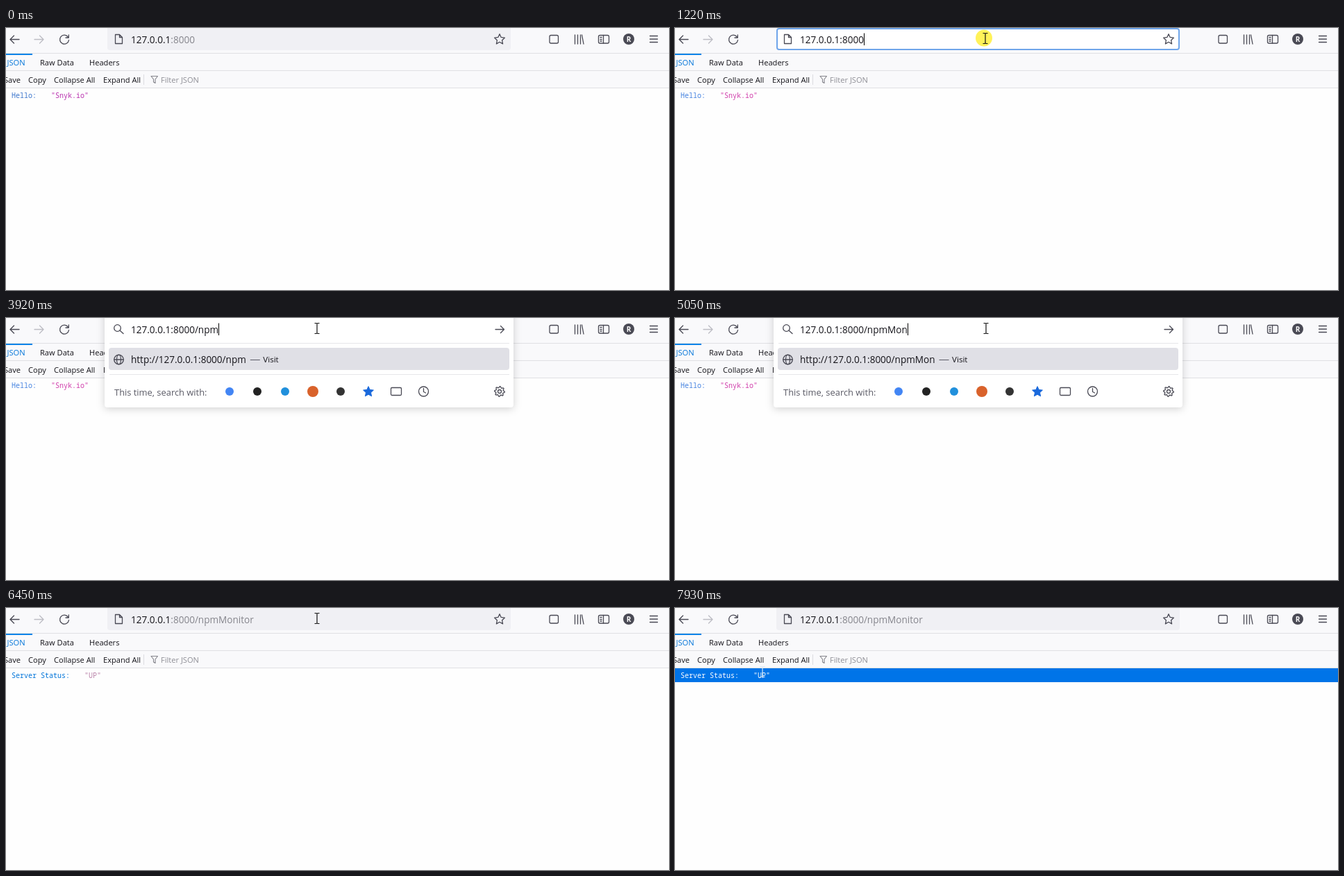
Animation of 955x378 px, one loop 8000 ms. Source, as an HTML page:

```html
<!DOCTYPE html>
<html lang="en">
<head>
<meta charset="utf-8">
<title>Browser address bar</title>
<style>
  html, body { margin: 0; width: 100%; height: 100%; overflow: hidden; background: #fefefe; }
  svg { display: block; width: 955px; height: 378px; }
  text { font: 11.1px "Open Sans", "Noto Sans", sans-serif; fill: #15141a; white-space: pre; }
  .url { font-size: 13.56px; }
  .visit { font-size: 11.6px; }
  .hint { font-size: 12.9px; fill: #5b5b66; }
  .mono { font: 10px "Noto Sans Mono", "DejaVu Sans Mono", monospace; }
  .icon { fill: none; stroke: #4a4a55; stroke-width: 1.3; stroke-linecap: round; stroke-linejoin: round; }
  #panel { filter: drop-shadow(0 2px 6px rgba(0, 0, 0, .18)); }
</style>
</head>
<body>
<svg viewBox="0 0 955 378">
  <rect width="955" height="378" fill="#fefefe"/>
  <rect width="955" height="86" fill="#f9f9fb"/>
  <path d="M0 36.5H955M0 61.5H955M0 86.5H955" stroke="#e0e0e3"/>

  <!-- navigation bar -->
  <g class="icon">
    <path d="M19 16.5H6M11.5 11L6 16.5L11.5 22"/>
    <path d="M41 16.5H54M48.5 11L54 16.5L48.5 22" stroke="#bdbdc4"/>
    <path d="M89.3 12.8A6.5 6.5 0 1 0 90.5 17.5M90.3 9.8V14H86"/>
    <rect x="783" y="10.5" width="12.5" height="11.5" rx="2"/>
    <path d="M819.5 10V23M823.5 10V23M827.5 10V23M829.5 10L832 23"/>
    <rect x="853.5" y="10.5" width="15" height="11.5" rx="2"/>
    <path d="M860.5 10.5V22M856 13.5H858M856 16.5H858M856 19H858"/>
    <path d="M927.5 11.5H938.5M927.5 16H938.5M927.5 20.5H938.5"/>
  </g>
  <circle cx="897" cy="16" r="8" fill="#4a4a55"/>
  <text x="897" y="19.8" text-anchor="middle" style="font-size:10px;font-weight:700;fill:#fff">R</text>

  <!-- viewer tabs and tools -->
  <rect y="37" width="38" height="2" fill="#0a84e8"/>
  <text x="27.5" y="54" text-anchor="end" style="fill:#0074d9">JSON</text>
  <text x="49" y="54">Raw Data</text>
  <text x="120" y="54">Headers</text>
  <text x="21" y="79" text-anchor="end">Save</text>
  <text x="32" y="79">Copy</text>
  <text x="69" y="79">Collapse All</text>
  <text x="140" y="79">Expand All</text>
  <path d="M198.5 67V82" stroke="#dcdce0"/>
  <path class="icon" d="M209 69.5H218.5L215 74V79.5L212.5 78V74Z" style="stroke:#85858c;stroke-width:1.1"/>
  <text x="223" y="79" style="fill:#8f8f96">Filter JSON</text>

  <!-- document row -->
  <rect id="row" y="87" width="955" height="20" fill="#0074e8"/>
  <text id="key" class="mono" x="8" y="101"></text>
  <text id="value" class="mono" y="101"></text>

  <!-- address bar -->
  <rect id="field" x="146" y="-4" width="581" height="36" rx="4" fill="#f0f0f4"/>
  <rect id="ring" x="147" y="1" width="579" height="30" rx="3" fill="#fff" stroke="#6fa5ea" stroke-width="2"/>

  <g id="panel">
    <rect id="sheet" fill="#fff" rx="4"/>
    <path d="M149 36.5H725M149 81.5H725" stroke="#e6e6ea"/>
    <rect x="148" y="43" width="577" height="32" rx="4" fill="#e0e0e6"/>
    <text id="link" class="url" x="180" y="65"></text>
    <path id="dash" stroke="#5b5b66"/>
    <text id="visit" class="visit" y="64.3">Visit</text>
    <text class="hint" x="156" y="112">This time, search with:</text>
    <g class="icon">
      <circle cx="160.5" cy="14.5" r="4.8"/>
      <path d="M164.2 18.2L169 22.5M705 16.5H717.5M712.5 11.5L717.5 16.5L712.5 21.5"/>
      <circle cx="162.5" cy="60" r="6.8"/>
      <ellipse cx="162.5" cy="60" rx="3" ry="6.8"/>
      <path d="M156 60H169"/>
      <rect x="554.5" y="100.5" width="15" height="11" rx="1.5"/>
      <circle cx="601.5" cy="106" r="7"/>
      <path d="M601.5 101.5V106.5L604.5 108"/>
      <path id="gear"/>
      <circle cx="711" cy="106" r="2.5"/>
    </g>
    <circle cx="322" cy="106" r="6" fill="#4285f4"/>
    <circle cx="362" cy="106" r="6" fill="#222"/>
    <circle cx="402" cy="106" r="6" fill="#2190dc"/>
    <circle cx="442" cy="106" r="8" fill="#d9622b"/>
    <circle cx="482" cy="106" r="6" fill="#333"/>
    <path id="mark" fill="#1a69dc" stroke="#1a69dc" stroke-linejoin="round"/>
  </g>

  <g id="closed" class="icon">
    <path d="M157.5 9.5H163.5L167.5 13.5V22.5H157.5ZM163.5 9.5V13.5H167.5"/>
    <path id="star"/>
  </g>
  <rect id="pick" x="180" y="7" height="18" fill="#0078d7"/>
  <text class="url" x="180" y="21.5"><tspan id="host">127.0.0.1</tspan><tspan id="rest"></tspan></text>
  <rect id="caret" y="7.5" width="1" height="17.5" fill="#000"/>

  <!-- pointer -->
  <g id="pointer">
    <circle id="glow" cx="-2" cy="-.5" r="12" fill="#fff03c" opacity=".85"/>
    <path id="beam" fill="none" stroke-width="1.2" d="M-3.5 -7.5H-1L0 -6.8L1 -7.5H3.5M0 -7V7M-3.5 7.5H-1L0 6.8L1 7.5H3.5"/>
    <path id="arrow" fill="#fff" stroke="#000" d="M.5 .5V16L4 12.7L6.3 18L8.7 17L6.4 11.8H11.3Z"/>
  </g>
</svg>
<script>
const LOOP = 8000;
const PATH = "/npmMonitor";
const KEY_TIMES = [2630, 2990, 3520, 3920, 4110, 4450, 4980, 5380, 5650, 5780, 5910];
const CARET_OFF = [[1900, 2430], [4650, 4980], [6180, LOOP]];
const CLICKS = [[810, 950], [1150, 1340]];
// time, x, y
const MOVES = [
  [130, 826, 317], [330, 745, 248], [550, 560, 95], [720, 460, 22], [820, 447, 15],
  [1360, 447, 15], [1500, 448, 15], [7060, 448, 15], [7400, 285, 66], [7640, 140, 94], [7740, 126, 92]
];

const $ = Object.fromEntries([...document.querySelectorAll("[id]")].map(el => [el.id, el]));
const set = (el, attrs) => { for (const name in attrs) el.setAttribute(name, attrs[name]); };
const show = (el, on) => el.setAttribute("visibility", on ? "visible" : "hidden");
const write = (el, text) => { if (el.textContent !== text) el.textContent = text; };
const within = (spans, t) => spans.some(([from, to]) => t >= from && t < to);

function ringPath(cx, cy, count, radius) {
  const points = Array.from({ length: count }, (_, i) => {
    const angle = i * 2 * Math.PI / count - Math.PI / 2;
    const r = radius(i);
    return (cx + r * Math.cos(angle)).toFixed(2) + " " + (cy + r * Math.sin(angle)).toFixed(2);
  });
  return "M" + points.join("L") + "Z";
}
const starPath = (cx, cy, r) => ringPath(cx, cy, 10, i => i % 2 ? r * .48 : r);
set($.star, { d: starPath(711, 16.5, 7.8) });
set($.mark, { d: starPath(522, 106.5, 7.8) });
set($.gear, { d: ringPath(711, 106, 32, i => i % 4 < 2 ? 7.3 : 5.5) });

function pointerAt(t) {
  let i = 0;
  while (i < MOVES.length - 2 && t >= MOVES[i + 1][0]) i++;
  const [t0, x0, y0] = MOVES[i], [t1, x1, y1] = MOVES[i + 1];
  const k = Math.min(1, Math.max(0, (t - t0) / (t1 - t0)));
  return [x0 + (x1 - x0) * k, y0 + (y1 - y0) * k];
}

function drawAddress(t) {
  const focused = t >= 880 && t < 6310;
  const open = t >= 2630 && t < 6310;
  const picked = t >= 880 && t < 1150;
  const typed = PATH.slice(0, KEY_TIMES.filter(at => t >= at).length);

  show($.field, !focused);
  show($.ring, focused && !open);
  show($.panel, open);
  show($.closed, !open);
  show($.pick, picked);
  show($.caret, focused && !picked && !within(CARET_OFF, t));

  write($.rest, ":8000" + typed);
  $.host.style.fill = picked ? "#fff" : "#15141a";
  $.rest.style.fill = picked ? "#fff" : focused ? "#15141a" : "#85858c";
  const width = $.host.parentNode.getComputedTextLength();
  set($.pick, { width });
  set($.caret, { x: Math.round(180 + width) });

  if (!open) return;
  const grow = t < 2700 ? 0 : 2;
  set($.sheet, { x: 144 - grow, y: -10, width: 585 + 2 * grow, height: 137 + grow });
  write($.link, "http://127.0.0.1:8000" + typed);
  const end = 180 + $.link.getComputedTextLength();
  set($.dash, { d: `M${end + 6} 60.5H${end + 20}` });
  set($.visit, { x: end + 24.5 });
}

function drawDocument(t) {
  const loaded = t >= 6450;
  const blank = t >= 6380 && !loaded;
  const chosen = t >= 7870;
  const key = blank ? "" : loaded ? "Server Status:" : "Hello:";
  write($.key, key);
  write($.value, blank ? "" : loaded ? '"UP"' : '"Snyk.io"');
  set($.value, { x: 29 + key.length * 6 });
  $.key.style.fill = chosen ? "#fff" : loaded ? "#0074d9" : t < 500 ? "#3a74cc" : "#4482e0";
  $.value.style.fill = chosen ? "#fff" : loaded ? (t < 7060 ? "#b981a8" : "#c845a8") : t < 500 ? "#b92fae" : "#d03cab";
  $.value.style.fontWeight = loaded ? 400 : 500;
  show($.row, chosen);
}

function drawPointer(t) {
  const [x, y] = pointerAt(t);
  const overText = y < 32 || t >= 7740;
  const visible = t >= 130;
  set($.pointer, { transform: `translate(${x.toFixed(1)} ${y.toFixed(1)})` });
  set($.beam, { stroke: t >= 7870 ? "#dce9f6" : "#111" });
  show($.beam, visible && overText);
  show($.arrow, visible && !overText);
  show($.glow, within(CLICKS, t));
}

function frame() {
  const t = performance.now() % LOOP;
  drawAddress(t);
  drawDocument(t);
  drawPointer(t);
  requestAnimationFrame(frame);
}
frame();
</script>
</body>
</html>
```
